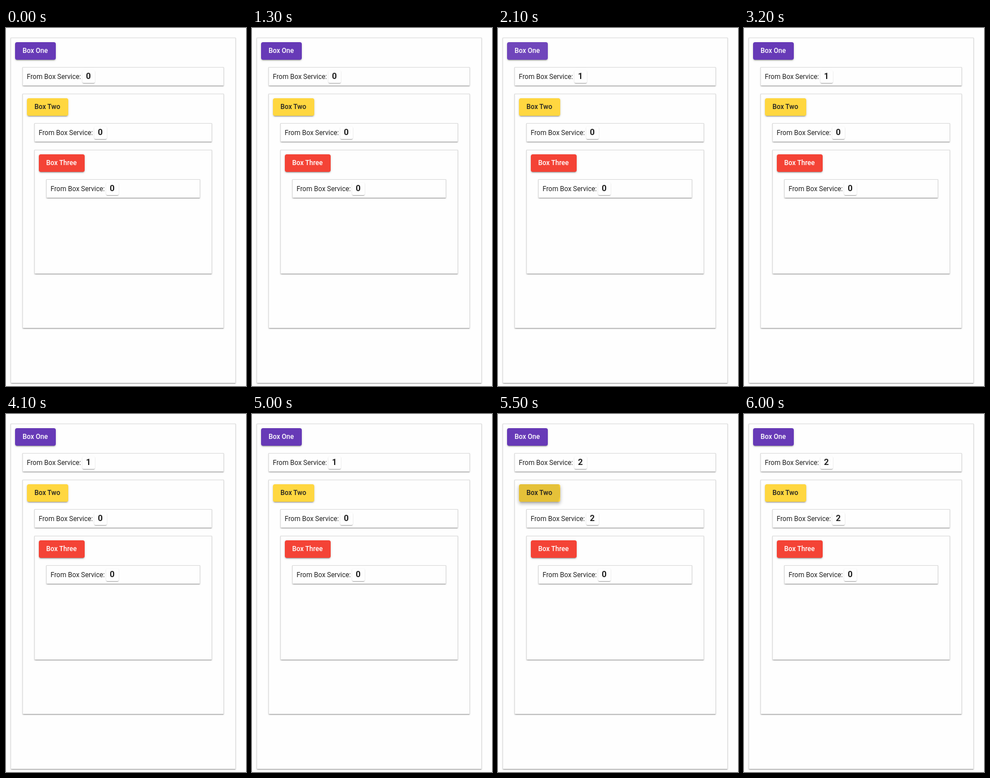
Recreate the animation shown at these times as an HTML page. Size 424 px wide and 632 px high, loop 8000 ms.

```html
<!DOCTYPE html>
<html lang="en">
<head>
<meta charset="utf-8">
<title>Nested boxes</title>
<style>
  html, body { margin: 0; width: 100%; height: 100%; overflow: hidden; background: #fefefe; }
  #stage { position: relative; width: 424px; height: 632px; overflow: hidden; font: 12px/16px Roboto, sans-serif; color: #222; }
  #stage div { position: absolute; box-sizing: border-box; white-space: nowrap; }
  .card, .num {
    background: #fefefe;
    box-shadow: 0 1.7px .9px -.9px rgba(0,0,0,.2), 0 .9px .9px rgba(0,0,0,.14), 0 .9px 2.6px rgba(0,0,0,.12);
  }
  .card { border: 1px solid #dcdcdc; }
  .num { border-radius: 2px; font-size: 15px; font-weight: 700; line-height: 21px; text-align: center; }
  .num span { position: absolute; inset: 0; }
  .btn {
    border-radius: 3.5px; overflow: visible; font-weight: 500; line-height: 30px; text-align: center;
    box-shadow: 0 2.6px .9px -1.7px rgba(0,0,0,.2), 0 1.7px 1.7px 0 rgba(0,0,0,.14), 0 .9px 4.3px 0 rgba(0,0,0,.12);
  }
  #stage .clip { inset: 0; overflow: hidden; border-radius: inherit; }
  .ripple { border-radius: 50%; opacity: 0; }
</style>
</head>
<body>
<div id="stage"></div>
<script>
const LOOP = 8000;
const stage = document.getElementById('stage');

function add(parent, cls, x, y, w, h, text = '') {
  const el = document.createElement('div');
  el.className = cls;
  el.textContent = text;
  Object.assign(el.style, { left: x + 'px', top: y + 'px', width: w + 'px', height: h + 'px' });
  return parent.appendChild(el);
}

// Steps are [time in ms, styles, easing towards the next step].
function play(el, steps) {
  el.animate(steps.map(([ms, style, easing = 'linear']) => ({ ...style, offset: ms / LOOP, easing })),
    { duration: LOOP, iterations: Infinity });
}

const shadow = (a, b, c) =>
  `0 ${a} rgba(0,0,0,.2), 0 ${b} rgba(0,0,0,.14), 0 ${c} rgba(0,0,0,.12)`;
const REST = shadow('2.6px .9px -1.7px', '1.7px 1.7px 0px', '.9px 4.3px 0px');
const RAISED = shadow('4.3px 4.3px -2.6px', '6.9px 8.6px .9px', '2.6px 12px 1.7px');
const OUT = 'cubic-bezier(0,0,.2,1)';
const INOUT = 'cubic-bezier(.4,0,.2,1)';
const HELD = 200;

function press(btn, at, color) {
  const w = btn.offsetWidth, h = btn.offsetHeight, r = Math.hypot(w, h) / 2 + 1;
  const clip = document.createElement('div');
  clip.className = 'clip';
  btn.append(clip);
  const dot = add(clip, 'ripple', w / 2 - r, h / 2 - r, 2 * r, 2 * r);
  dot.style.background = color;
  const small = { transform: 'scale(0)' }, full = { transform: 'scale(1)' };
  play(dot, [
    [0, { ...small, opacity: 0 }], [at, { ...small, opacity: 0 }],
    [at, { ...small, opacity: 1 }, OUT], [at + 450, { ...full, opacity: 1 }, OUT],
    [at + 850, { ...full, opacity: 0 }], [LOOP, { ...full, opacity: 0 }]
  ]);
  play(btn, [
    [0, { boxShadow: REST }], [at, { boxShadow: REST }, OUT],
    [at + HELD, { boxShadow: RAISED }, INOUT],
    [at + HELD + 280, { boxShadow: REST }], [LOOP, { boxShadow: REST }]
  ]);
}

// Values are [start in ms, digit]; each digit shows until the next start.
function counter(x, y, values) {
  const num = add(stage, 'num', x, y, 22, 22);
  values.forEach(([from, digit], i) => {
    const to = i + 1 < values.length ? values[i + 1][0] : LOOP;
    const el = document.createElement('span');
    el.textContent = digit;
    num.append(el);
    const off = { opacity: 0 }, on = { opacity: 1 };
    play(el, [[0, from ? off : on], [from, from ? off : on], [from, on],
      [to, on], [to, to < LOOP ? off : on], [LOOP, to < LOOP ? off : on]]);
  });
}

const CLICK_ONE = 1600, CLICK_TWO = 5200;
const boxes = [
  { x: 8, y: 17, w: 398, h: 610, name: 'Box One', bw: 72, bg: '#673ab7', ink: '#fff',
    click: CLICK_ONE, tint: 'rgba(255,255,255,.1)',
    values: [[0, 0], [CLICK_ONE + HELD, 1], [CLICK_TWO + HELD, 2]] },
  { x: 29, y: 116, w: 356, h: 414, name: 'Box Two', bw: 73, bg: '#ffd740', ink: '#222',
    click: CLICK_TWO, tint: 'rgba(0,0,0,.1)', values: [[0, 0], [CLICK_TWO + HELD, 2]] },
  { x: 50, y: 215, w: 314, h: 219, name: 'Box Three', bw: 81, bg: '#f44336', ink: '#fff',
    values: [[0, 0]] }
];

for (const b of boxes) {
  add(stage, 'card', b.x, b.y, b.w, b.h);
  const btn = add(stage, 'btn', b.x + 7.5, b.y + 7.6, b.bw, 31, b.name);
  btn.style.background = b.bg;
  btn.style.color = b.ink;
  if (b.click) press(btn, b.click, b.tint);
  add(stage, 'card', b.x + 21, b.y + 52, b.w - 42, 33);
  add(stage, 'label', b.x + 28.7, b.y + 60.5, 100, 16, 'From Box Service:');
  counter(b.x + 126.5, b.y + 57.5, b.values);
}
</script>
</body>
</html>
```
